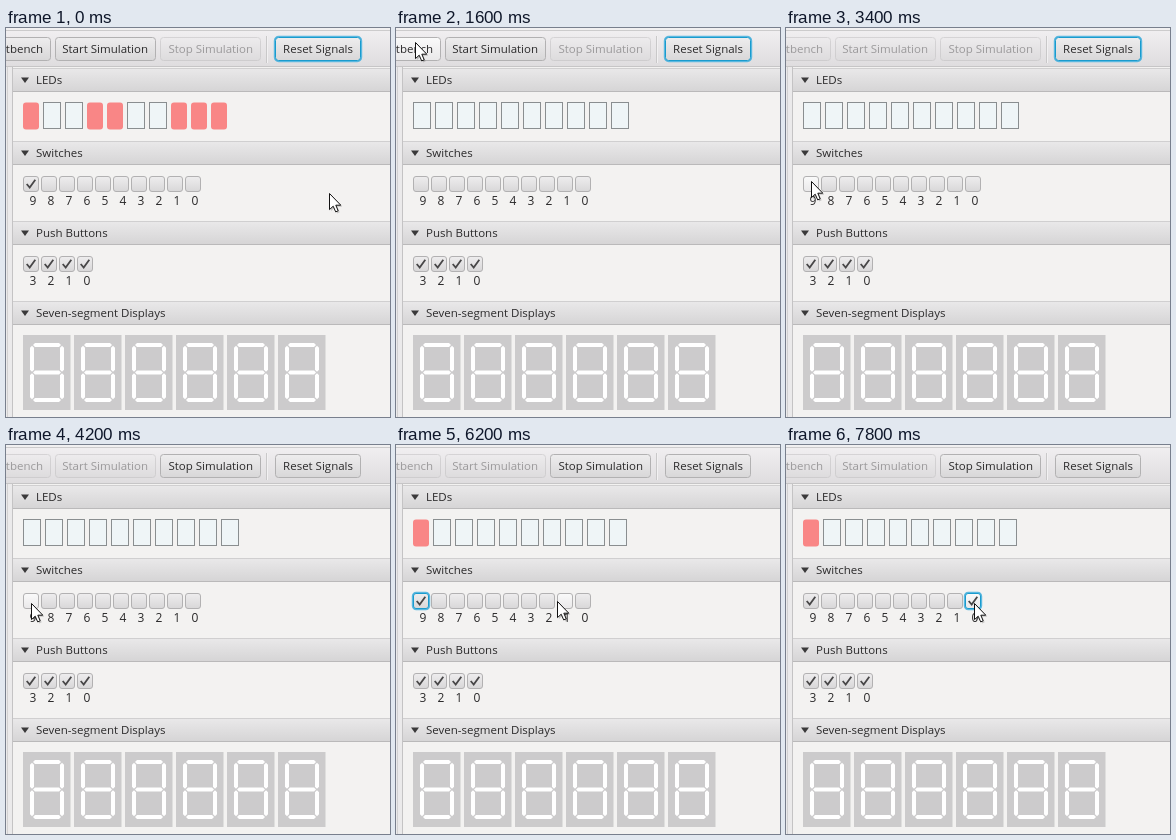
An HTML page for the animation above (8000 ms loop, 384x389 px).

```html
<!DOCTYPE html>
<html lang="en">
<head>
<meta charset="utf-8">
<title>Signal panel</title>
<style>
  html, body { margin: 0; width: 100%; height: 100%; overflow: hidden; background: #f3f2f1; }
  svg { display: block; width: 384px; height: 389px; }
  text { font: 11.5px "Open Sans", "Noto Sans", sans-serif; fill: #2b2a2b; }
  .digit { font-size: 12px; }
</style>
</head>
<body>
<svg id="stage" viewBox="0 0 384 389">
  <defs>
    <linearGradient id="bar" x2="0" y2="1"><stop stop-color="#f0eef0"/><stop offset="1" stop-color="#dfdddf"/></linearGradient>
    <linearGradient id="head" x2="0" y2="1"><stop stop-color="#e9e8e9"/><stop offset="1" stop-color="#d6d5d6"/></linearGradient>
    <linearGradient id="face" x2="0" y2="1"><stop stop-color="#eeedee"/><stop offset="1" stop-color="#d8d7d8"/></linearGradient>
    <linearGradient id="lit" x2="0" y2="1"><stop stop-color="#fafafa"/><stop offset="1" stop-color="#e9e8e9"/></linearGradient>
  </defs>
</svg>
<script>
const TICK = 200, TICKS = 40;
const stage = document.getElementById('stage');

const set = (el, attrs) => { for (const k in attrs) el.setAttribute(k, attrs[k]); };
function add(tag, attrs, parent = stage) {
  const el = document.createElementNS('http://www.w3.org/2000/svg', tag);
  set(el, attrs);
  return parent.appendChild(el);
}
const box = (x, y, width, height, fill, more, parent) =>
  add('rect', { x, y, width, height, fill, ...more }, parent);
function label(x, y, str, more, parent) {
  add('text', { x, y, ...more }, parent).textContent = str;
}

// Value of the latest row [tick, value...] at or before the tick
const latest = (rows, tick) => rows.filter(r => r[0] <= tick).pop();

// Window frame
box(0, 0, 384, 3, '#f1f0f1');
box(0, 2, 384, 1, '#cccbcc');
box(0, 3, 384, 35, 'url(#bar)');
box(0, 38, 384, 1, '#c6c5c6');
box(0, 39, 6, 350, '#ebeaeb');
box(1, 39, 1, 350, '#d2d1d2');
box(6, 39, 1, 350, '#c4c3c4');
box(260, 8, 1, 27, '#c9c8c9');
box(261, 8, 1, 27, '#f2f1f2');

// Controls that can be hovered, focused and disabled
const controls = {};
function control(id, x, y, w, h, r) {
  const g = add('g', {});
  const glow = box(x - .3, y - .3, w + .6, h + .6, 'none', { rx: r + 1, stroke: '#5ab8e0', 'stroke-width': 1.8 }, g);
  const face = box(x + .5, y + .5, w - 1, h - 1, 'url(#face)', { rx: r, stroke: '#b2b1b2' }, g);
  return controls[id] = { g, glow, face, x, y, w, h };
}
function button(id, x, w, str) {
  const c = control(id, x, 9, w, 24, 3);
  label(x + w - 8, 25, str, { 'text-anchor': 'end' }, c.g);
}
function check(id, x, y, digit) {
  const c = control(id, x, y, 16, 16, 2.5);
  c.mark = add('path', {
    d: `M${x + 3.7} ${y + 8}L${x + 6.7} ${y + 11.6}L${x + 12.3} ${y + 3.8}`,
    fill: 'none', stroke: '#484748', 'stroke-width': 1.8
  }, c.g);
  label(x + 10, y + 29, digit, { 'text-anchor': 'middle', class: 'digit' });
}

button('bench', -70, 115, 'Testbench');
button('start', 49, 101, 'Start Simulation');
button('stop', 154, 101, 'Stop Simulation');
button('reset', 269, 86, 'Reset Signals');

[[41, 'LEDs'], [114, 'Switches'], [194, 'Push Buttons'], [274, 'Seven-segment Displays']].forEach(([y, str]) => {
  box(7, y - 1, 377, 1, '#d0cfd0');
  box(7, y, 377, 22, 'url(#head)');
  box(7, y + 22, 377, 1, '#bab9ba');
  add('path', { d: `M15 ${y + 8.5}h8l-4 5.5z`, fill: '#3a393a' });
  label(30, y + 15, str);
});

const leds = Array.from({ length: 10 }, () => box(0, 0, 0, 0, 'none'));
for (let i = 0; i < 10; i++) check('sw' + (9 - i), 17 + 18 * i, 148, 9 - i);
for (let i = 0; i < 4; i++) check('pb' + (3 - i), 17 + 18 * i, 228, 3 - i);

// Seven-segment digits
const across = y => `M10 ${y}l2 -2h24l2 2l-2 2h-24z`;
const upright = (x, y) => `M${x} ${y}l2 2v22l-2 2l-2 -2v-22z`;
const digit = [10, 37.5, 65].map(across).join('') +
  [9, 39].map(x => upright(x, 10.7) + upright(x, 38.3)).join('');
for (let i = 0; i < 6; i++) {
  const g = add('g', { transform: `translate(${17 + 51 * i} 307)` });
  box(0, 0, 47.5, 75, '#cccbcc', {}, g);
  add('path', { d: digit, fill: '#fff' }, g);
}

const pointer = add('g', {});
const arrow = 'M.5 .5V16.6L4.2 13.2L6.7 18.9L9.2 17.8L6.8 12.2H11.8Z';
add('path', { d: arrow, fill: '#000', opacity: .18, transform: 'translate(1.5 1.5)' }, pointer);
add('path', { d: arrow, fill: '#fff', stroke: '#111', 'stroke-width': 1 }, pointer);

// Timelines in ticks
const path = [
  [0, 323, 165], [1, 332, 148], [2, 357, 72], [3, 316, 33], [4, 300, 23],
  [5, 170, 20], [6, 30, 16], [7, 22, 15], [8, 19, 14], [9, 58, 35], [10, 98, 21],
  [12, 92, 30], [13, 54, 95], [14, 38, 125], [15, 30, 144], [16, 27, 151], [17, 25, 153],
  [18, 25, 184], [19, 25, 158], [27, 36, 164], [28, 62, 184], [29, 98, 190],
  [30, 132, 176], [31, 161, 156], [32, 183, 157], [33, 186, 156], [34, 190, 158],
  [35, 189, 159], [37, 188, 158]
];
const focus = [[0, 'reset'], [10, 'start'], [12, 'reset'], [21, ''], [22, 'sw9'], [37, ''], [39, 'sw0']];
const lights = [[0, '1001100111'], [4, '0000000000'], [24, '1000000000']];

function drawLeds(bits) {
  let x = 17;
  leds.forEach((el, i) => {
    if (bits[i] === '1') {
      set(el, { x, y: 74.5, width: 16, height: 27, rx: 3, fill: '#f98686', stroke: 'none' });
      x += 20;
    } else {
      set(el, { x: x + .5, y: 74.5, width: 17, height: 26, rx: 0, fill: '#eff5f7', stroke: '#8a8e90' });
      x += 22;
    }
  });
}

function draw(tick) {
  const [, px, py] = latest(path, tick);
  const focused = latest(focus, tick)[1];
  const off = { bench: tick >= 12, start: tick >= 12, stop: tick < 18 };
  const on = { sw9: tick < 4 || tick >= 22, sw0: tick >= 39 };
  for (const id in controls) {
    const c = controls[id];
    const over = px >= c.x && px < c.x + c.w && py >= c.y && py < c.y + c.h;
    set(c.g, { opacity: off[id] ? .4 : 1 });
    set(c.glow, { visibility: id === focused ? 'visible' : 'hidden' });
    set(c.face, {
      fill: over ? 'url(#lit)' : 'url(#face)',
      stroke: id === focused ? '#1a9bcd' : '#b2b1b2'
    });
    if (c.mark) set(c.mark, { visibility: on[id] || id.startsWith('pb') ? 'visible' : 'hidden' });
  }
  drawLeds(latest(lights, tick)[1]);
  set(pointer, { transform: `translate(${px} ${py})` });
}

let shown = -1;
const begin = performance.now();
function loop() {
  const tick = Math.floor((performance.now() - begin) / TICK) % TICKS;
  if (tick !== shown) draw(shown = tick);
  requestAnimationFrame(loop);
}
loop();
</script>
</body>
</html>
```
